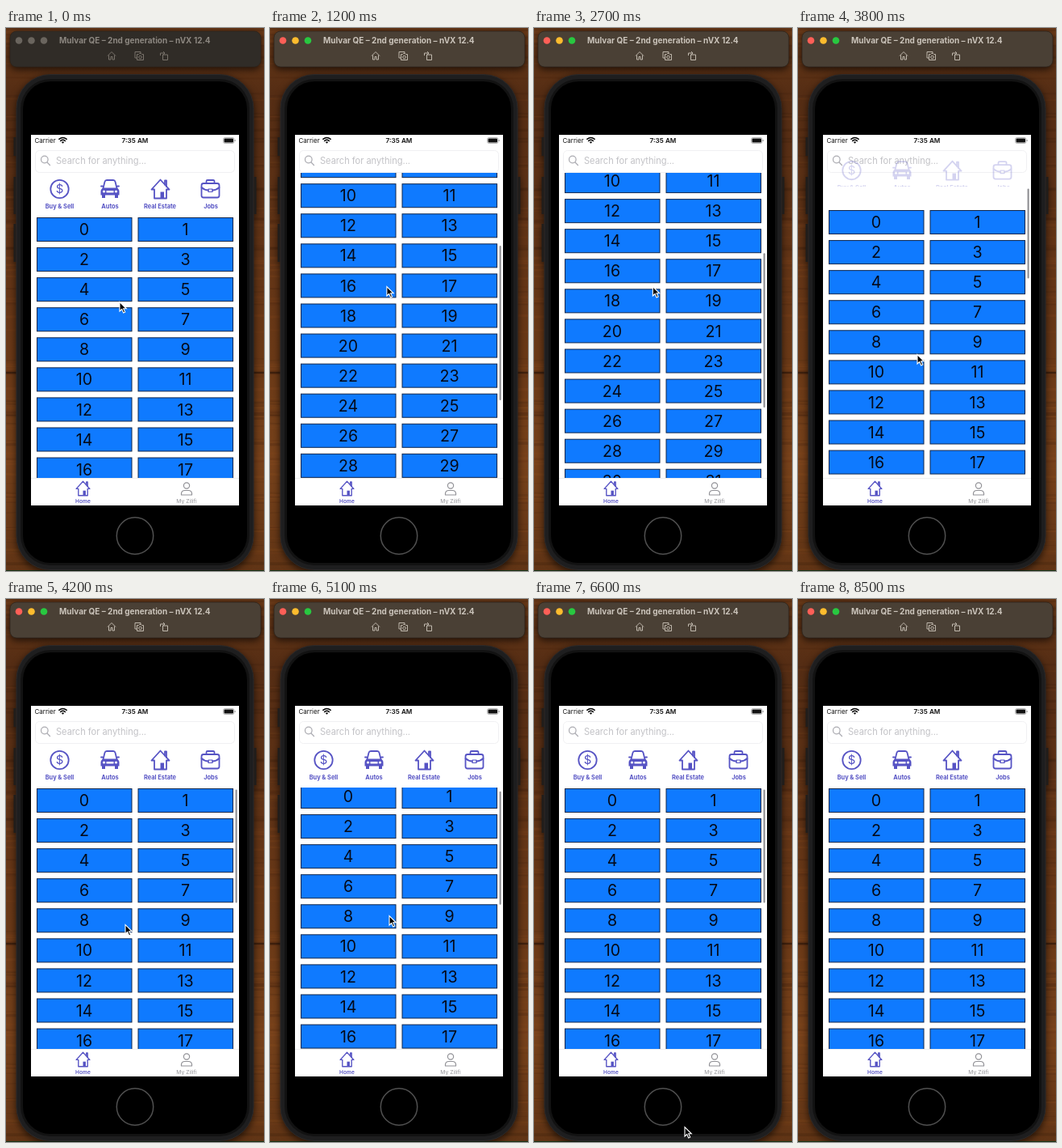
Recreate the animation shown at these times as an HTML page. Size 320 by 671 pixels, loop 8600 ms.

```html
<!DOCTYPE html>
<html lang="en">
<head>
<meta charset="utf-8">
<title>Collapsing header list</title>
<style>
  html, body { margin: 0; width: 100%; height: 100%; overflow: hidden; background: #5c3115; }
  svg { display: block; width: 320px; height: 671px; font-family: Inter, Roboto, sans-serif; }
  .line { fill: none; stroke: currentColor; stroke-width: 1.8; stroke-linejoin: round; stroke-linecap: round; }
  .thin { stroke-width: 1.2; }
  .purple { color: #5653c4; fill: #5653c4; }
  .mid { text-anchor: middle; }
  .label { font-size: 7.4px; font-weight: 700; text-anchor: middle; }
  .tile { fill: #0f7aff; stroke: #10264a; }
  .number { font-size: 19.6px; fill: #050a18; text-anchor: middle; }
  .raised { filter: drop-shadow(0 3px 5px #000a); }
</style>
</head>
<body>
<svg viewBox="0 0 320 671">
  <defs>
    <linearGradient id="wood" x2="0" y2="1">
      <stop offset="0" stop-color="#6b3a18"/>
      <stop offset=".12" stop-color="#552d14"/>
      <stop offset=".4" stop-color="#623416"/>
      <stop offset=".63" stop-color="#6c3a17"/>
      <stop offset=".8" stop-color="#78421b"/>
      <stop offset="1" stop-color="#603415"/>
    </linearGradient>
    <clipPath id="listClip"><rect id="listWindow" x="31" y="233" width="258" height="323"/></clipPath>
    <clipPath id="headerClip"><rect id="headerWindow" x="31" y="132" width="258" height="101"/></clipPath>
    <g id="house">
      <path class="line" d="M-11 .5 0-11.500 11 .5H7.500V11.500H-7.500V.5Z"/>
      <path class="line" d="M5.500-5.500V-10.500H7.500V-3"/>
      <path d="M0 11.500V3.500H4.500V11.500Z" fill="currentColor"/>
    </g>
  </defs>

  <rect width="320" height="671" fill="url(#wood)"/>
  <g id="grain"></g>
  <path d="M0 426H320" stroke="#241208" stroke-width="2.500" opacity=".6"/>
  <path d="M0 670.500H320" stroke="#17351a"/>

  <rect id="bar" class="raised" x="5" y="4" width="311" height="44" rx="8" stroke="#2b251e" stroke-width=".7"/>
  <g id="lights"><circle cx="16" cy="15.500" r="4.300"/><circle cx="31.500" cy="15.500" r="4.300"/><circle cx="47" cy="15.500" r="4.300"/></g>
  <text id="title" x="66" y="19" font-size="10" font-weight="700">Mulvar QE – 2nd generation – nVX 12.4</text>
  <g id="tools" fill="none" stroke-width="1">
    <path d="M126 34.500 131 29.500 136 34.500M127.500 33.500V39H130V35.500H132V39H134.500V33.500"/>
    <path d="M162 37H160V29.500H167V31M162.500 32.500H164.500L165.500 31.500H167.500L168.500 32.500H170.500V39.500H162.500Z"/>
    <circle cx="166.500" cy="36" r="1.800"/>
    <path d="M194.500 33H200.500V39.500H194.500ZM191.500 34V31H197M195 29 197 31 195 33"/>
  </g>

  <g class="raised">
    <path d="M11 135V158M11 184V230M11 242V289M309 184V230" stroke="#201d1b" stroke-width="3"/>
    <rect x="13" y="57.500" width="294" height="612" rx="42" fill="#1e1e1f" stroke="#2b292a"/>
  </g>
  <rect x="18" y="63" width="284" height="601" rx="37" fill="#121212"/>
  <rect x="21" y="66" width="278" height="595" rx="34"/>
  <circle cx="160" cy="627.500" r="22.700" fill="none" stroke="#505050" stroke-width="1.500"/>
  <rect x="31" y="132" width="258" height="458" fill="#fff"/>

  <g fill="#111">
    <text x="35.500" y="142" font-size="8">Carrier</text>
    <text class="mid" x="160" y="142" font-size="8.200" font-weight="600">7:35 AM</text>
    <path class="line" d="M65.800 137.300Q70.500 133.600 75.200 137.300M67.600 139.500Q70.500 137.200 73.400 139.500" style="stroke-width:1.500"/>
    <path d="M68.800 140.900Q70.500 139.800 72.200 140.900L70.500 142.700Z"/>
    <rect x="269.500" y="135.500" width="13.500" height="7" rx="2" fill="none" stroke="#999" stroke-width=".7"/>
    <rect x="270.500" y="136.500" width="11.500" height="5" rx="1"/>
    <path d="M284 138V140" stroke="#888"/>
  </g>

  <rect x="36.500" y="151.500" width="247" height="27" rx="5" fill="#fff" stroke="#f0f0f2"/>
  <g color="#aaaab0">
    <circle class="line thin" cx="47.800" cy="162.500" r="4.300"/>
    <path class="line thin" d="M51 166 54.500 169.500"/>
  </g>
  <text x="62" y="168" font-size="11.050" fill="#c2c2c6">Search for anything...</text>

  <g clip-path="url(#headerClip)">
    <g id="header" class="purple">
      <circle class="line" cx="66.500" cy="199" r="11.200"/>
      <text class="mid" x="66.500" y="204.200" font-size="15">$</text>
      <g transform="translate(129 199)">
        <path class="line" d="M-8.500-1-6.500-9Q-6-11-4-11H4Q6-11 6.500-9L8.500-1M-11-3.500H-9.500M9.500-3.500H11"/>
        <path fill-rule="evenodd" d="M-8.500-1.500H8.500Q11.500 0 11.500 3V7.500H10V11H6V7.500H-6V11H-10V7.500H-11.500V3Q-11.500 0-8.500-1.500ZM-4.500 2V4.500H4.500V2Z"/>
        <circle cx="-7.500" cy="3" r="1.600" fill="#fff"/><circle cx="7.500" cy="3" r="1.600" fill="#fff"/>
      </g>
      <use href="#house" x="191.500" y="199"/>
      <g transform="translate(253.500 199)">
        <rect class="line" x="-11" y="-7" width="22" height="17.500" rx="2.500"/>
        <path class="line" d="M-5-7V-9.500Q-5-11-3.500-11H3.500Q5-11 5-9.500V-7M-11-2Q-7 1.500-2.500 1.500M11-2Q7 1.500 2.500 1.500"/>
        <rect class="line thin" x="-2.500" y="0" width="5" height="3.500"/>
      </g>
      <text class="label" x="66.500" y="222.500">Buy &amp; Sell</text>
      <text class="label" x="129" y="222.500">Autos</text>
      <text class="label" x="191" y="222.500">Real Estate</text>
      <text class="label" x="254" y="222.500">Jobs</text>
    </g>
  </g>

  <g clip-path="url(#listClip)"><g id="list"></g></g>
  <rect id="scrollbar" x="284.600" width="2" rx="1" fill="#8a8a8e"/>

  <path d="M31 556.500H289" stroke="#e4e4e6" stroke-width=".6"/>
  <g class="purple">
    <use href="#house" transform="translate(95.500 569) scale(.76)"/>
    <text class="mid" x="95.500" y="587" font-size="6.600" font-weight="600">Home</text>
  </g>
  <g color="#929297" fill="#929297">
    <circle class="line thin" cx="224" cy="565.500" r="3.600"/>
    <path class="line thin" d="M217.500 577V575Q218 571.500 221.500 571.500H226.500Q230 571.500 230.500 575V577Z"/>
    <text class="mid" x="224" y="587" font-size="6.800">My Zilifi</text>
  </g>

  <path id="cursor" d="M0 0V11.500L2.700 9 4.700 13.500 6.700 12.600 4.700 8.300H8.300Z" stroke="#fff" stroke-width="1.100"/>
</svg>

<script>
const $ = id => document.getElementById(id);
const LOOP = 8600, STEP = 100;
const HEADER = 54, LIST_TOP = 233, LIST_BOTTOM = 556;
const ROWS = 20, PITCH = 37.07, CONTENT = 745;

// Tracks are [seconds, value] pairs, eased between points.
const scrollTrack = [[.7, 0], [1.15, 170], [1.35, 190], [1.75, -15], [2, 0], [2.3, 30], [2.8, 210],
  [3.1, 230], [3.6, 0], [3.8, -28], [4.2, 0], [5, 0], [5.1, 5], [5.8, 208], [6, 225], [6.35, -15], [6.6, 0]];
const collapseTrack = [[.8, 0], [1.1, 1], [1.6, 1], [1.9, 0], [2.2, 0], [2.5, 1], [3.7, 1], [3.8, .685],
  [4, 0], [5.15, 0], [5.45, 1], [6.2, 1], [6.5, 0]];
const barTrack = [[.7, 0], [.8, 1], [4.5, 1], [4.8, 0], [5, 0], [5.1, 1], [7, 1], [7.3, 0]];
const cursorX = [[0, 141], [2, 147], [3.8, 148], [5.1, 148], [5.8, 149], [6.3, 156], [6.6, 187], [6.8, 200]];
const cursorY = [[0, 339], [.6, 390], [1.15, 320], [1.4, 320], [1.8, 430], [2.1, 430], [2.7, 320], [3.2, 320],
  [3.8, 404], [5, 400], [5.1, 392], [5.6, 318], [5.9, 318], [6.3, 440], [6.6, 653], [6.8, 700]];

function sample(track, time) {
  const i = track.findIndex(point => point[0] > time);
  if (i === 0) return track[0][1];
  if (i < 0) return track[track.length - 1][1];
  const [t0, v0] = track[i - 1], [t1, v1] = track[i];
  const p = (time - t0) / (t1 - t0);
  return v0 + (v1 - v0) * p * p * (3 - 2 * p);
}

function set(node, attributes) {
  for (const key in attributes) node.setAttribute(key, attributes[key]);
}

function add(parent, tag, attributes, text = '') {
  const node = document.createElementNS(parent.namespaceURI, tag);
  set(node, attributes);
  node.textContent = text;
  parent.append(node);
}

function buildGrain() {
  let seed = 7;
  const random = () => (seed = seed * 16807 % 2147483647) / 2147483647;
  for (let i = 0; i < 110; i++) {
    const y = random() * 670, bend = random() * 16 - 8;
    add($('grain'), 'path', {
      d: `M0 ${y}Q160 ${y + bend} 320 ${y + bend / 2}`, fill: 'none',
      stroke: random() < .6 ? '#2d160a' : '#965222',
      'stroke-width': .8 + random() * 3, opacity: .06 + random() * .14
    });
  }
}

function buildTiles() {
  for (let i = 0; i < ROWS * 2; i++) {
    const x = 38.5 + (i % 2) * 125.5, y = 1.5 + Math.floor(i / 2) * PITCH;
    add($('list'), 'rect', { class: 'tile', x, y, width: 117.5, height: 29 });
    add($('list'), 'text', { class: 'number', x: x + 58.5, y: y + 21.6 }, i);
  }
}

function drawWindow(active) {
  const colors = active ? ['#ff5f57', '#febc2e', '#28c840'] : Array(3).fill('#6a655e');
  [...$('lights').children].forEach((light, i) => set(light, { fill: colors[i] }));
  set($('bar'), { fill: active ? '#4a4035' : '#302c27' });
  set($('title'), { fill: active ? '#cbc4bb' : '#8c8780' });
  set($('tools'), { stroke: active ? '#c0b8ad' : '#79736b' });
}

function draw(time) {
  const scroll = sample(scrollTrack, time);
  const collapse = sample(collapseTrack, time);
  const top = LIST_TOP - HEADER * collapse, height = LIST_BOTTOM - top;

  drawWindow(time >= .6);
  set($('headerWindow'), { height: top - 132 });
  set($('header'), {
    transform: `translate(0 ${-.62 * HEADER * collapse})`,
    opacity: Math.pow(1 - collapse, 1.2)
  });
  set($('listWindow'), { y: top, height });
  set($('list'), { transform: `translate(0 ${top - scroll})` });

  const overscroll = Math.max(0, -scroll);
  set($('scrollbar'), {
    y: top + 2.5 + Math.max(0, scroll) * height / CONTENT,
    height: height * height / CONTENT - 2.25 * overscroll,
    opacity: sample(barTrack, time)
  });
  set($('cursor'), {
    transform: `translate(${sample(cursorX, time)} ${sample(cursorY, time) - .5})`,
    visibility: time < 6.8 ? 'visible' : 'hidden'
  });
}

function frame(now) {
  draw(Math.floor(now % LOOP / STEP) * STEP / 1000);
  requestAnimationFrame(frame);
}

buildGrain();
buildTiles();
draw(0);
requestAnimationFrame(frame);
</script>
</body>
</html>
```
